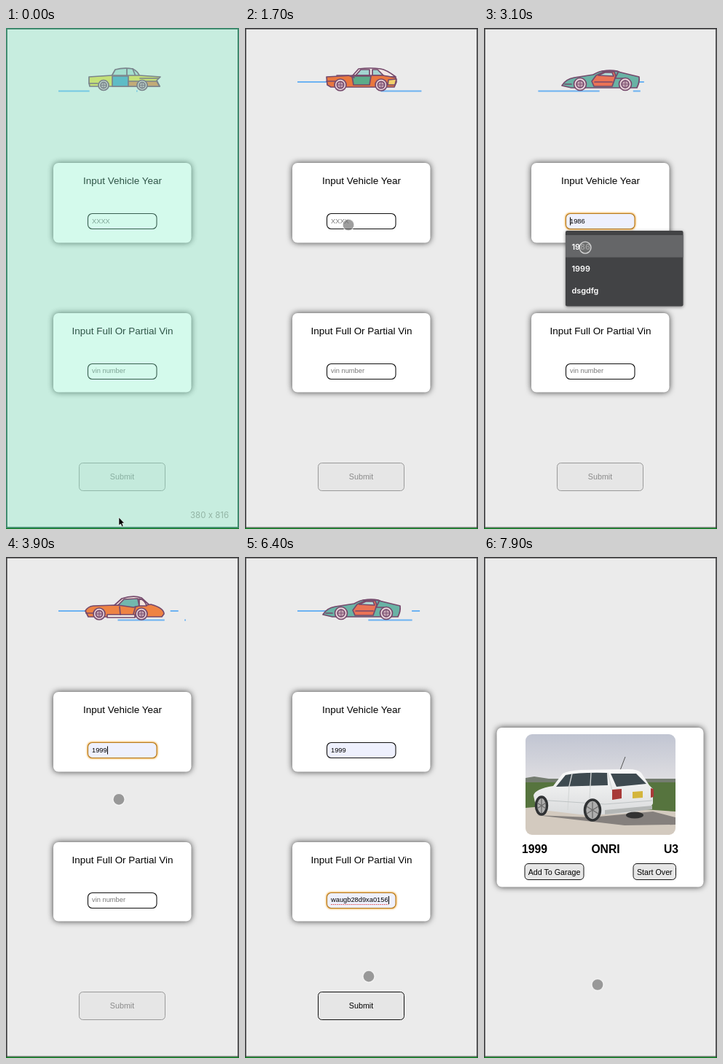
Animation of 320x687 px, one loop 8000 ms. Source, as an HTML page:

```html
<!DOCTYPE html>
<html lang="en">
<head>
<meta charset="utf-8">
<title>Vehicle lookup</title>
<style>
html, body { margin: 0; width: 100%; height: 100%; overflow: hidden; background: #ebebeb; }
svg { display: block; width: 320px; height: 687px; font-family: "Liberation Sans", Arial, sans-serif; }
.card { fill: #fff; filter: drop-shadow(0 0 4.2px rgba(0,0,0,.75)); }
.box { fill: #fff; stroke: #111; stroke-width: 1.1; }
.box.filled { fill: #eef0fd; }
.box.focus { stroke: #b47a22; filter: drop-shadow(0 0 1.2px #f2b04a) drop-shadow(0 0 1px #f2b04a); }
.title { font-size: 13.47px; text-anchor: middle; }
.value { font-size: 9.3px; }
.hint { fill: #777; }
.button { font-size: 10.7px; text-anchor: middle; }
.button rect { fill: #e6e6e6; stroke: #111; }
.off rect { stroke: #999; }
.off text { fill: #8a8a8a; }
.menu { font: 600 10.8px Inter, sans-serif; fill: #fff; }
.panel { fill: #424345; filter: drop-shadow(0 1px 2px rgba(0,0,0,.5)); }
.hover { fill: #656668; }
.result { font-size: 15.7px; font-weight: bold; }
.car { stroke: #754a6c; stroke-width: 1.7; stroke-linejoin: round; stroke-linecap: round; fill: none; }
.wind { stroke: #6cb2f2; stroke-width: 2; }
</style>
</head>
<body>
<svg viewBox="0 0 320 687">
  <defs>
    <clipPath id="windClip"><path d="M72 60h175v40H72z"/></clipPath>
    <clipPath id="photoClip"><rect x="57" y="243" width="206" height="138" rx="9"/></clipPath>
    <linearGradient id="sky" x2="0" y2="1"><stop stop-color="#c1c5d2"/><stop offset="1" stop-color="#e0dfe2"/></linearGradient>
    <linearGradient id="paint" x2="0" y2="1"><stop stop-color="#fafafa"/><stop offset="1" stop-color="#d9dbdc"/></linearGradient>
  </defs>
  <rect width="320" height="687" fill="#ebebeb"/>

  <g id="form">
    <path id="wind" class="wind" clip-path="url(#windClip)"/>
    <g id="cars"></g>

    <rect class="card" x="65" y="185" width="189.500" height="109.500" rx="7"/>
    <text class="title" x="160" y="214">Input Vehicle Year</text>
    <rect id="yearBox" class="box" x="112.500" y="254.500" width="94.500" height="21" rx="6"/>
    <text id="year" class="value" x="118" y="268.300"></text>

    <rect class="card" x="65" y="391" width="189.500" height="108.500" rx="7"/>
    <text class="title" x="160" y="420">Input Full Or Partial Vin</text>
    <rect id="vinBox" class="box" x="112.500" y="460.500" width="94.500" height="21" rx="6"/>
    <text id="vin" class="value" x="118" y="473.300"></text>
    <path id="spelling" d="M118 476.500h79" stroke="#e04848" stroke-dasharray="1.500 1.200"/>
    <path id="caret" stroke="#000"/>

    <g id="submit" class="button">
      <rect x="100.500" y="596.500" width="118" height="38" rx="5"/>
      <text x="159.500" y="619">Submit</text>
    </g>

    <g id="yearMenu" class="menu">
      <rect class="panel" x="112" y="278" width="161.500" height="103.500" rx="2"/>
      <rect id="yearHover" class="hover" x="112" width="161.500" height="30.500"/>
      <text x="120.500" y="304">1986</text><text x="120.500" y="334">1999</text><text x="120.500" y="364">dsgdfg</text>
    </g>
    <g id="vinMenu" class="menu">
      <rect class="panel" x="112" y="483" width="161.500" height="43" rx="2"/>
      <rect id="vinHover" class="hover" x="112" y="489.500" width="161.500" height="30.500"/>
      <text x="120.500" y="509">waugb28d9xa0156</text>
    </g>
  </g>

  <g id="found">
    <rect class="card" x="17.500" y="234" width="284" height="218.500" rx="7"/>
    <g clip-path="url(#photoClip)">
      <path fill="url(#sky)" d="M57 243h206v66H57z"/>
      <path fill="#747c70" d="M57 303l12-2 20 3h174v10H57z"/>
      <path fill="#56743e" d="M57 309h206v44H57z"/>
      <path fill="#d3cabf" d="M57 344l60-5 146 10v34H57z"/>
      <path fill="#85807d" d="M72 354l75 3 85-8 31 8v10l-70 1z"/>
      <path d="M186 295l8-21" stroke="#555"/>
      <path fill="url(#paint)" d="M68 327q2-9 27-13l13-17q8-4 25-5l65-1q13 0 18 5l11 17 5 5v20q-3 9-35 13l-33 2-24 1-68-8z"/>
      <path fill="#3e4a50" d="M99 315l13-16q20-4 57-3l1 17zM174 297h35l14 14-41 4z"/>
      <path d="M121 297l-4 17-2 33M147 296l-2 35M170 296l6 24" stroke="#d5d8d8" stroke-width="1.300" fill="none"/>
      <path d="M74 333l92 6 65-5" stroke="#bfc4c5" fill="none"/>
      <path fill="#a83a38" d="M176 319l13-1v13l-13 2zM229 317l4 1v11l-4 1z"/>
      <path fill="#d4b53c" d="M204 322l14-1v9l-14 1z"/>
      <path fill="#b4b7b6" d="M166 347l65-6v5l-65 7z"/>
      <g fill="#aeaeae" stroke="#303234" stroke-width="3.500">
        <ellipse cx="79" cy="341" rx="7.500" ry="12"/><ellipse cx="149" cy="347" rx="10.500" ry="14"/>
      </g>
      <path d="M79 331v20M73 337l12 8M73 345l12-8M149 336v22M141 342l16 10M141 352l16-10" stroke="#6c6c6c" stroke-width="1.300"/>
      <ellipse cx="207" cy="354" rx="12" ry="4.500" fill="#333"/>
    </g>
    <g class="result">
      <text x="52" y="406">1999</text>
      <text x="167" y="406" text-anchor="middle">ONRI</text>
      <text x="267" y="406" text-anchor="end">U3</text>
    </g>
    <g class="button">
      <rect x="56" y="420.500" width="81" height="22" rx="5"/><text x="96.500" y="435.700">Add To Garage</text>
      <rect x="205" y="420.500" width="58.500" height="22" rx="5"/><text x="234.300" y="435.700">Start Over</text>
    </g>
  </g>

  <circle id="dot" r="8" fill="rgba(112,112,112,.68)" stroke="rgba(255,255,255,.75)" stroke-width="1.300"/>
  <path d="M.8 0V686M319 0V686M0 .8H320" stroke="#3c3c3e" stroke-width="1.700"/>
  <path d="M0 685H320" stroke="#3c3c3e"/>
  <path d="M0 686.300H320" stroke="#0a7a1e" stroke-width="1.400"/>

  <g id="resize">
    <rect width="320" height="686" fill="rgb(132,241,201)" opacity=".35"/>
    <path d="M.8 .8H319V685H.8z" fill="none" stroke="#3a8a6c" stroke-width="1.700"/>
    <text x="253" y="672" font-size="11.500" fill="#93b5a5" style="font-family:Inter,sans-serif">380 x 816</text>
    <path d="M155 671v11l2.500-2 2 4 1.500-1-1.500-4h3z" stroke="#fff" stroke-width=".6"/>
  </g>
</svg>
<script>
const LOOP = 8000, CAR_TIME = 1080, CAR_LEAD = 100, BLINK = 1060;
const $ = id => document.getElementById(id);
const show = (id, on) => { $(id).style.display = on ? '' : 'none'; };

const shape = (d, fill = 'none') => `<path d="${d}" fill="${fill}"/>`;
const wheel = (x, y, r) =>
  `<circle cx="${x}" cy="${y}" r="${r}" fill="#e9d5db"/><circle cx="${x}" cy="${y}" r="${r * .58}" fill="#c6a6b4"/>` +
  `<path stroke-width=".9" d="M${x - r * .5} ${y}h${r}M${x} ${y - r * .5}v${r}"/>`;

const cars = [
  // two-tone sedan with fins
  shape('M145 66l5-9q12-3 24-1 7 3 10 11z', '#b5d5d2') + shape('M166 56v10M174 56l4 10') +
  shape('M114 67l31-2h38l29 2-5 5 4 8H115l-1-5z', '#e6d84e') +
  shape('M146 66h22v14h-22z', '#4aa0c4') + shape('M168 73l39 0 4 7h-43z', '#e3854c') +
  shape('M114 76h12M184 69h25') + wheel(134, 78.5, 7) + wheel(187, 78.5, 7),
  // muscle car
  shape('M148 65l8-9q16-2 30 0 8 1 21 11z', '#f3e8e6') + shape('M152 65l7-8h12v8zM175 57h7l8 8h-15z', '#a3d4d0') +
  shape('M112 67l36-2h41l18 3 1 6-3 7H118l-5-3z', '#e9773f') +
  shape('M147 66h26l-2 12h-22z', '#5bab8a') + shape('M197 71l11-1-2 8h-10z', '#f2d16a') +
  shape('M112 73h12M126 65h16l8 3') + wheel(131, 78, 8) + wheel(187, 78, 8),
  // sports car
  shape('M146 66l17-7q10-2 20 0l12 6z', '#b0dad6') +
  shape('M107 79q5-9 17-11l26-4q8-5 15-5h15l33 8q1 7-3 15h-90z', '#69b3a5') +
  shape('M154 65l11-5h14l2 6-5 14h-25l-3-7z', '#ea7356') + shape('M157 65l9-4h10l2 5z', '#b0dad6') +
  shape('M184 61l-4 8h13M152 74h24M111 77h9') + wheel(132, 77, 8.5) + wheel(194, 77, 8.5),
  // classic coupe
  shape('M148 67l11-10q16-5 27-1l11 10z', '#f3e5df') +
  shape('M109 74q3-6 11-7l29-1 38 1 12-2q18 5 18 13l-3 4H113z', '#ee8344') +
  shape('M154 66l8-8 19-1 2 10-8 2z', '#72b7ae') + shape('M183 57q8 2 10 10h-10z', '#f3e5df') +
  shape('M139 79h38v4h-38z', '#f4eee8') + shape('M156 68l1 11M178 68l-3 10M110 77h9') +
  wheel(128, 78, 8) + wheel(186, 78, 8),
];
$('cars').innerHTML = cars.map(c => `<g class="car">${c}</g>`).join('');

// [ms, x, y] of the pointer
const pointer = [
  [300, 155, 672], [850, 145, 282], [1700, 142, 270], [2500, 142, 270], [2800, 140, 298], [3100, 139, 301],
  [3350, 142, 330], [3700, 143, 331], [3900, 155, 332], [4450, 160, 503], [4700, 160, 476], [5400, 160, 475],
  [5700, 157, 504], [5900, 157, 504], [6400, 170, 575], [6800, 160, 618], [7200, 158, 628], [7900, 156, 586.5],
];
// [ms, cycles] of the passing air streaks
const breeze = [[0, .98], [1700, 6.15], [3100, 10.694], [3900, 13.31], [5400, 18], [6400, 21.233], [8000, 26.4]];

function sample(keys, t) {
  if (t <= keys[0][0]) return keys[0].slice(1);
  const i = keys.findIndex(k => k[0] > t);
  if (i < 0) return keys[keys.length - 1].slice(1);
  const a = keys[i - 1], b = keys[i], u = (t - a[0]) / (b[0] - a[0]);
  return a.slice(1).map((v, j) => v + (b[j + 1] - v) * u);
}

function drawWind(t) {
  const phase = sample(breeze, t)[0] % 1;
  let d = '';
  const streak = (a, b, y) => { if (b > a) d += `M${a} ${y}H${b}`; };
  // each gust outlives its cycle slightly, so two can overlap
  for (const p of [phase, phase + 1]) {
    if (p > 1.05) continue;
    const gust = 283 - 105 * p, half = Math.max(.8, Math.min(5, 20 * (1 - p)));
    streak(218 - 206 * p, 266 - 154 * p, 86.5);
    streak(gust - half, gust + half, 86.5);
    streak(96 - 206 * p, 150 - 130 * p, 74);
    if (p > .2) streak(239.5 - 44 * p, 250.5 - 44 * p, 74);
  }
  $('wind').setAttribute('d', d);
}

function setField(id, text, hint, focus) {
  $(id).textContent = text || hint;
  $(id).classList.toggle('hint', !text);
  $(id + 'Box').classList.toggle('filled', !!text);
  $(id + 'Box').classList.toggle('focus', focus);
}

function draw(t) {
  const [x, y] = sample(pointer, t);
  const between = (a, b) => t >= a && t < b;
  const done = t >= 7400, yearMenu = between(2000, 3700), vinMenu = between(4900, 5900);

  show('resize', t < 300);
  show('dot', t >= 300);
  $('dot').setAttribute('transform', `translate(${x} ${y})`);
  show('form', !done);
  show('found', done);
  if (done) return;

  const current = Math.floor((t + CAR_LEAD) / CAR_TIME) % cars.length;
  [...$('cars').children].forEach((c, i) => { c.style.display = i === current ? '' : 'none'; });
  drawWind(t);

  const row = Math.floor((y - 284) / 30.3), onYear = yearMenu && row >= 0 && row < 2;
  const onVin = vinMenu && y > 489;
  show('yearMenu', yearMenu);
  show('yearHover', onYear);
  $('yearHover').setAttribute('y', 284 + 30.3 * row);
  show('vinMenu', vinMenu);
  show('vinHover', onVin);

  const chosen = t >= 5900, vinFocus = t >= 4900;
  const year = t >= 3700 ? '1999' : onYear ? ['1986', '1999'][row] : '';
  setField('year', year, 'XXXX', between(2000, 4900));
  setField('vin', chosen || onVin ? 'waugb28d9xa0156' : '', 'vin number', vinFocus);
  show('spelling', chosen);
  $('submit').classList.toggle('off', !chosen);

  const since = [5900, 4900, 3700, 2000].find(s => t >= s);
  show('caret', since && (t - since) % BLINK < BLINK / 2);
  const caretX = chosen ? 197.5 : between(3700, 4900) ? 139.5 : 118.5;
  $('caret').setAttribute('d', `M${caretX} ${vinFocus ? 465 : 259.5}v11`);
}

const start = performance.now();
function tick() {
  draw((performance.now() - start) % LOOP);
  requestAnimationFrame(tick);
}
tick();
</script>
</body>
</html>
```
